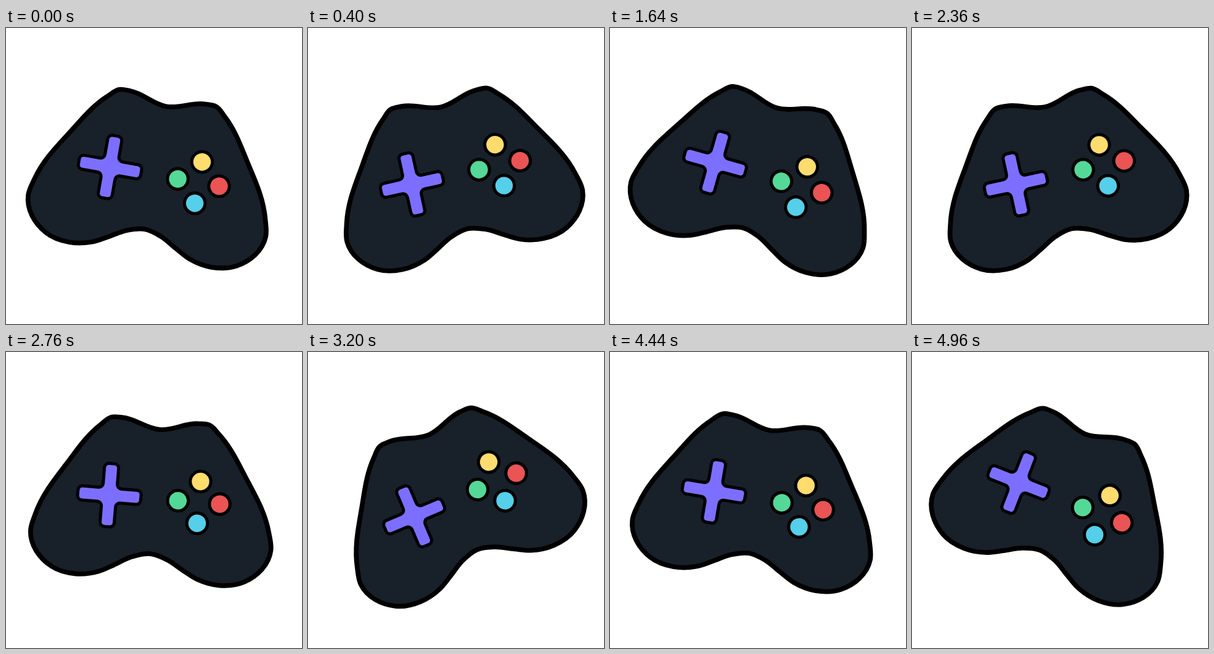
An HTML page with a canvas for the animation above (5 s loop, 480 by 480 pixels).

```html
<!DOCTYPE html>
<html lang="en">
<head>
<meta charset="utf-8">
<title>Gamepad</title>
<style>
  html, body { margin: 0; width: 100%; height: 100%; overflow: hidden; background: #fff; }
  canvas { display: block; width: 100vmin; height: 100vmin; }
</style>
</head>
<body>
<canvas id="stage" width="480" height="480"></canvas>
<script>
const canvas = document.getElementById('stage');
const ctx = canvas.getContext('2d');

const LOOP = 5000;
const STEP = 40;
const CYCLE = 3640;
const REST = -12.4;
const START = 10;

// Steering poses in one cycle: [ms, degrees], eased between neighbours.
const POSES = [
  [0, START], [395, REST],
  [580, REST], [915, 17.4], [1120, 9.5], [1400, 24], [2160, REST],
  [2345, REST], [2630, 16.3], [2885, -6.3], [3260, -24], [CYCLE, START]
];

// Key points down the right half of the body, from the centre line.
const RIGHT = [
  [0, -114.5], [62, -129.2], [80, -128.3], [96, -115], [145, -49], [190, 38],
  [195.5, 66], [157, 120.5], [117, 129.5], [80, 122.5], [56, 110], [28, 94.5], [0, 87.5]
];

const BUTTON_COLORS = ['#ffdc6e', '#ea5455', '#55cfea', '#54d898'];

const mirror = points => points.concat(
  points.slice(1, -1).reverse().map(([x, y]) => [-x, y]));

// Closed curve whose tangent at each point is that of the circle through its neighbours.
function smoothPath(points) {
  const n = points.length;
  const at = i => points[(i + n) % n];
  const edge = i => {
    const dx = at(i + 1)[0] - at(i)[0];
    const dy = at(i + 1)[1] - at(i)[1];
    return { angle: Math.atan2(dy, dx), length: Math.hypot(dx, dy) };
  };
  const tangent = i => {
    const a = edge(i - 1);
    const b = edge(i);
    const turn = Math.atan2(Math.sin(b.angle - a.angle), Math.cos(b.angle - a.angle));
    return a.angle + turn * a.length / (a.length + b.length);
  };
  const handle = (i, reach) => [
    at(i)[0] + reach * Math.cos(tangent(i)),
    at(i)[1] + reach * Math.sin(tangent(i))
  ];

  const path = new Path2D();
  path.moveTo(...at(0));
  for (let i = 0; i < n; i++) {
    const reach = edge(i).length * 0.35;
    path.bezierCurveTo(...handle(i, reach), ...handle(i + 1, -reach), ...at(i + 1));
  }
  path.closePath();
  return path;
}

function crossPath(reach, half, radius) {
  const corners = [];
  let quarter = [[-half, -reach], [half, -reach], [half, -half]];
  for (let i = 0; i < 4; i++) {
    corners.push(...quarter);
    quarter = quarter.map(([x, y]) => [-y, x]);
  }
  const path = new Path2D();
  path.moveTo(0, -reach);
  for (let i = 1; i <= corners.length; i++) {
    const next = corners[(i + 1) % corners.length];
    path.arcTo(...corners[i % corners.length], ...next, radius);
  }
  path.closePath();
  return path;
}

function discPath(x, y, r) {
  const path = new Path2D();
  path.arc(x, y, r, 0, Math.PI * 2);
  return path;
}

const BODY = smoothPath(mirror(RIGHT));
const CROSS = crossPath(51.3, 11.5, 7);

function paint(path, color, line) {
  ctx.fillStyle = color;
  ctx.fill(path);
  ctx.lineWidth = line;
  ctx.stroke(path);
}

function tiltAt(t) {
  const i = POSES.findIndex(pose => pose[0] > t);
  const [t0, a] = POSES[i - 1];
  const [t1, b] = POSES[i];
  const ease = (1 - Math.cos(Math.PI * (t - t0) / (t1 - t0))) / 2;
  return a + (b - a) * ease;
}

function draw(now) {
  const t = Math.floor((now % LOOP) / STEP) * STEP;
  ctx.setTransform(1, 0, 0, 1, 0, 0);
  ctx.fillStyle = '#fff';
  ctx.fillRect(0, 0, 480, 480);
  ctx.translate(240, 240);
  ctx.rotate(tiltAt(t % CYCLE) * Math.PI / 180);
  ctx.strokeStyle = '#000';

  paint(BODY, '#18202a', 7.7);
  ctx.translate(-72.8, -2);
  paint(CROSS, '#7c6fff', 5);
  ctx.translate(145.6, 0);
  BUTTON_COLORS.forEach((color, i) => {
    const angle = (i - 1) * Math.PI / 2;
    paint(discPath(34 * Math.cos(angle), 34 * Math.sin(angle), 16.7), color, 5);
  });
}

const begin = performance.now();
function tick() {
  draw(performance.now() - begin);
  requestAnimationFrame(tick);
}
tick();
</script>
</body>
</html>
```
